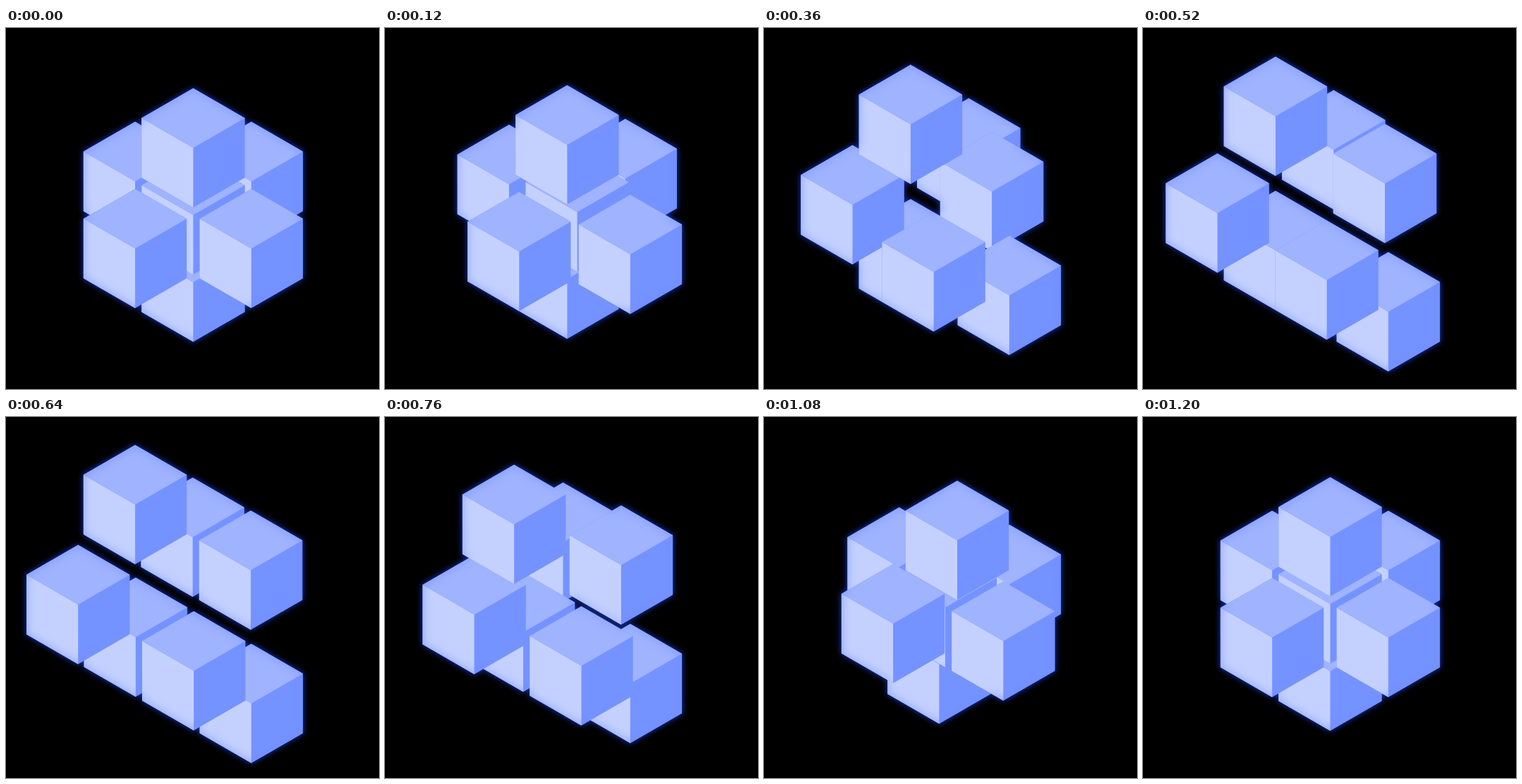
Recreate the animation shown at these times as an HTML page without scripts. Size 529 px wide and 512 px high, loop 1.3 s.

```html
<!DOCTYPE html>
<html lang="en">
<head>
<meta charset="utf-8">
<title>Shuffling cubes</title>
<style>
  /* 0 = rest, 1 = spread out, 2 = rest again with the cubes permuted */
  @property --p {
    syntax: "<number>";
    inherits: true;
    initial-value: 0;
  }
  html, body {
    margin: 0;
    width: 100%;
    height: 100%;
    overflow: hidden;
    background: #000;
  }
  .stage {
    position: absolute;
    left: 0;
    top: 0;
    width: 529px;
    height: 512px;
    filter: url(#glow);
    animation: shuffle 1300ms infinite;
  }
  /* Each move speeds up to its halfway point, then slows down */
  @keyframes shuffle {
    0%     { --p: 0;   animation-timing-function: cubic-bezier(.35, 0, .667, .31); }
    21.54% { --p: .5;  animation-timing-function: cubic-bezier(.25, .46, .6, .87); }
    46.15% { --p: 1;   animation-timing-function: cubic-bezier(.35, 0, .667, .31); }
    67.69% { --p: 1.5; animation-timing-function: cubic-bezier(.25, .46, .6, .87); }
    92.31%, 100% { --p: 2; }
  }

  /* x, y: start; ux, uy: spreading move; vx, vy: returning move (grid units) */
  .cube {
    --a: min(var(--p), 1);
    --b: max(var(--p) - 1, 0);
    position: absolute;
    left: 0;
    top: 0;
    width: 1px;
    height: 1px;
    overflow: visible;
    z-index: var(--z);
    transform: translate(
      calc(265.5px + 82.4px * (var(--x) + var(--ux) * var(--a) + var(--vx) * var(--b))),
      calc(180.7px + 47.6px * (var(--y) + var(--uy) * var(--a) + var(--vy) * var(--b))));
  }
  .top-back    { --z: 10; --x: 0;  --y: -2; --ux: -1; --uy: -1; --vx: 0;  --vy: 4; }
  .center      { --z: 7;  --x: 0;  --y: 0;  --ux: 1;  --uy: -1; --vx: -1; --vy: -1; }
  .upper-left  { --z: 5;  --x: -1; --y: -1; --ux: -1; --uy: 1;  --vx: 2;  --vy: 2; }
  .lower-left  { --z: 9;  --x: -1; --y: 1;  --ux: 1;  --uy: 1;  --vx: 1;  --vy: -1; }
  .bottom      { --z: 4;  --x: 0;  --y: 2;  --ux: -1; --uy: -1; --vx: 1;  --vy: -1; }
  .lower-right { --z: 8;  --x: 1;  --y: 1;  --ux: 0;  --uy: 2;  --vx: 0;  --vy: -4; }
  .upper-right { --z: 1;  --x: 1;  --y: -1; --ux: -1; --uy: -1; --vx: -1; --vy: 1; }

  /* Two cubes drop behind their neighbours on the way back */
  .upper-left  { animation: sink-left 1300ms step-end infinite; }
  .lower-right { animation: sink-right 1300ms step-end infinite; }
  @keyframes sink-left  { 0% { z-index: 5; } 69%, 100% { z-index: 3; } }
  @keyframes sink-right { 0% { z-index: 8; } 46.15%, 100% { z-index: 2; } }

  .defs { position: absolute; width: 0; height: 0; }
</style>
</head>
<body>
<svg class="defs" aria-hidden="true">
  <defs>
    <g id="cube">
      <path fill="#7593ff" d="M0 0L73.2 42.25V126.75L0 169L-73.2 126.75V42.25Z"/>
      <path fill="#c4d1ff" d="M-73.2 42.25L0 84.5V169L-73.2 126.75Z"/>
      <path fill="#9fb3ff" d="M0 0L73.2 42.25L0 84.5L-73.2 42.25Z"/>
    </g>
    <filter id="glow" x="0" y="0" width="1" height="1" color-interpolation-filters="sRGB">
      <feGaussianBlur in="SourceAlpha" stdDeviation="4.5" result="soft"/>
      <feFlood flood-color="#2348ff" flood-opacity=".8"/>
      <feComposite in2="soft" operator="in" result="halo"/>
      <feGaussianBlur in="SourceAlpha" stdDeviation="7" result="wide"/>
      <feFlood flood-color="#6f8eff" flood-opacity=".7"/>
      <feComposite in2="wide" operator="out"/>
      <feComposite in2="SourceAlpha" operator="in" result="rim"/>
      <feMerge>
        <feMergeNode in="halo"/>
        <feMergeNode in="SourceGraphic"/>
        <feMergeNode in="rim"/>
      </feMerge>
    </filter>
  </defs>
</svg>
<div class="stage">
  <svg class="cube upper-right"><use href="#cube"/></svg>
  <svg class="cube bottom"><use href="#cube"/></svg>
  <svg class="cube upper-left"><use href="#cube"/></svg>
  <svg class="cube center"><use href="#cube"/></svg>
  <svg class="cube lower-right"><use href="#cube"/></svg>
  <svg class="cube lower-left"><use href="#cube"/></svg>
  <svg class="cube top-back"><use href="#cube"/></svg>
</div>
</body>
</html>
```
